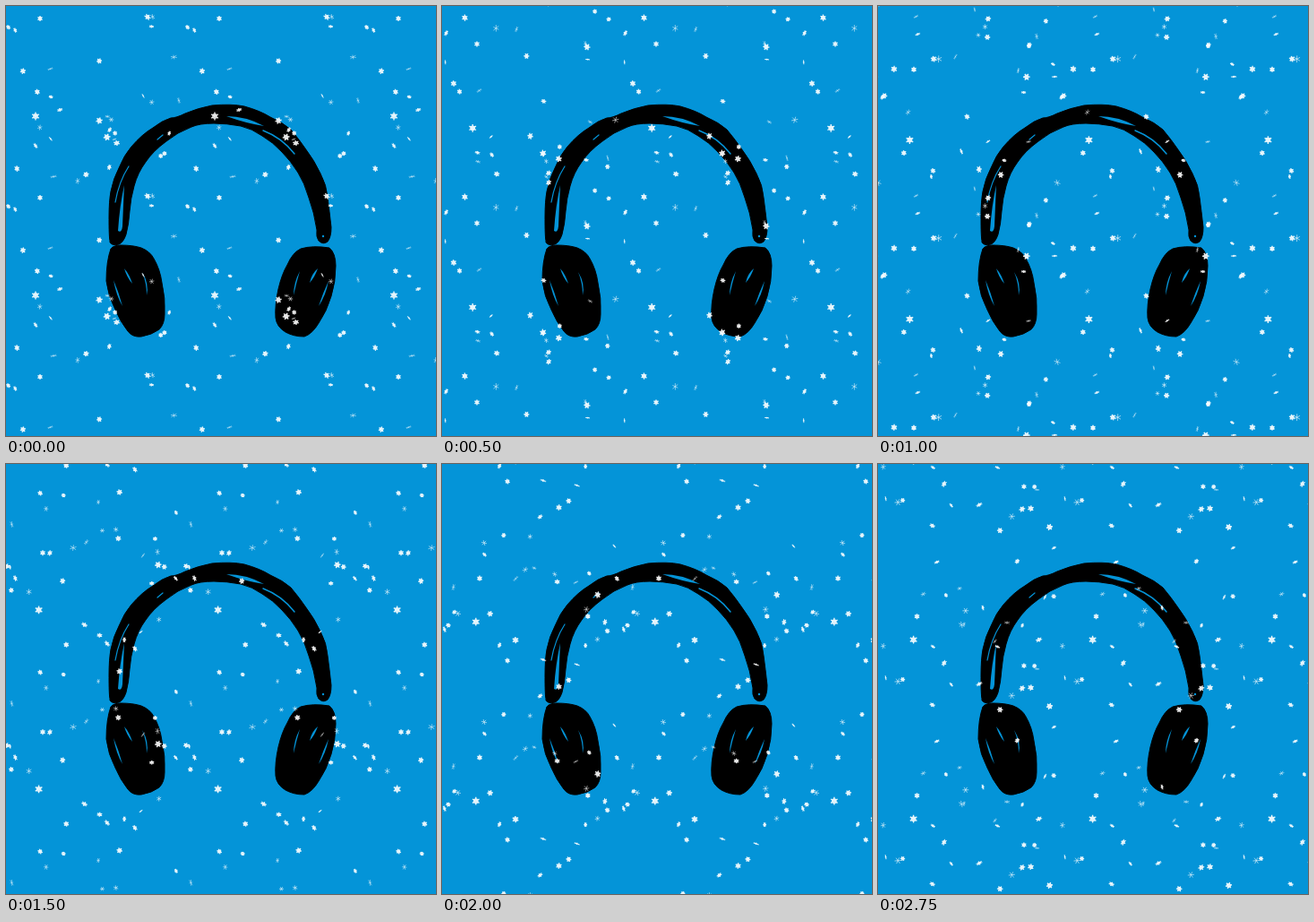
An HTML page with a canvas that plays this animation: 480 px wide and 480 px high, repeating every 3000 ms.

```html
<!DOCTYPE html>
<html lang="en">
<head>
<meta charset="utf-8">
<title>Headphones in the snow</title>
<style>
  html, body { margin: 0; width: 100%; height: 100%; overflow: hidden; background: #0494d8; }
  svg, canvas { position: absolute; inset: 0; width: 100%; height: 100%; display: block; }
  .body { stroke: #000; stroke-linejoin: round; }
  .slit { fill: none; stroke: #0494d8; stroke-linecap: round; }
  .gap { fill: #0494d8; }
</style>
</head>
<body>
<svg viewBox="0 0 480 480">
  <!-- headband -->
  <path class="body" d="M116 262C115 258 115 242 115 236Q115 218 117 207Q120 192 126 181Q132 166 140 157
    Q152 143 164 136Q174 128 184 125Q190 125 200 120Q214 114 230 111Q252 109 266 112
    Q284 117 295 124Q309 130 318 138Q328 150 334 159Q344 172 351 187Q358 200 359 214
    Q361 229 363 247Q363 258 359 263Q354 267 349 262Q346 258 347 250Q344 230 338 214
    Q333 197 326 186Q318 173 308 163Q298 152 286 145Q275 137 262 134Q246 131 232 131
    Q216 131 207 135Q191 141 179 151Q164 162 156 174Q147 186 143 201Q139 215 138 229
    Q137 244 134 255Q131 264 126 266Q119 268 116 264Z"/>
  <path class="gap" d="M132 200Q127 222 125 251Q129 254 130 246Q131 222 132 200Z"/>
  <path class="gap" d="M246 123Q268 123 288 134Q268 131 246 123Z"/>
  <path class="slit" stroke-width="1.2" d="M122 219Q126 196 137 179M169 149L175 144"/>
  <path class="slit" stroke-width="1.5" d="M287 139Q308 147 322 165"/>
  <circle class="gap" cx="354" cy="257" r="1.2"/>
  <!-- ear cups -->
  <path class="body" d="M117 271Q120 267 128 267Q142 267 151 270Q161 274 165 282Q172 294 174 309
    Q178 326 177 344Q177 355 171 361Q163 367 151 369Q141 370 136 363Q128 353 122 339
    Q114 324 112 307Q112 285 117 271Z"/>
  <path class="body" d="M361 270Q368 276 368 290Q368 308 363 324Q358 341 349 354Q342 366 333 369
    Q321 369 312 364Q302 358 301 348Q300 334 304 316Q308 299 314 289Q320 275 329 271
    Q342 267 361 270Z"/>
  <g class="gap">
    <path d="M120 306Q123 323 130 335Q126 320 120 306Z"/>
    <path d="M132 293Q138 300 141 310Q135 303 132 293Z"/>
    <path d="M152 297Q160 310 157 323Q157 309 152 297Z"/>
    <path d="M328 296Q321 309 321 323Q324 309 328 296Z"/>
    <path d="M348 293Q341 299 339 309Q345 302 348 293Z"/>
    <path d="M360 307Q357 323 349 335Q354 320 360 307Z"/>
  </g>
</svg>
<canvas id="snow" width="480" height="480"></canvas>
<script>
const SIZE = 480, TILE = 200, COUNT = 36, LOOP = 3000, STEP = 250;
const ctx = document.getElementById('snow').getContext('2d');

function seeded(seed) {
  return () => {
    seed = (seed * 1664525 + 1013904223) >>> 0;
    return seed / 2 ** 32;
  };
}

const random = seeded(29);
const between = (low, high) => low + (high - low) * random();
const wrap = v => ((v % TILE) + TILE) % TILE;

// Drift and fall are pixels per step; faint flakes are bare stars without a core.
function makeFlake() {
  const faint = random() < .35;
  return {
    x: between(0, TILE), y: between(0, TILE),
    drift: between(-4, 5), fall: between(6, 38),
    radius: faint ? between(2.4, 4) : between(2.4, 4),
    faint, angle: between(0, Math.PI), spin: between(-.5, .5),
    flip: between(0, Math.PI), tumble: between(.1, .4)
  };
}

const flakes = Array.from({ length: COUNT }, makeFlake);

// The two most prominent flakes fall slowly and almost face on.
const facing = { radius: 4.4, faint: false, angle: 0, spin: 0, flip: 0, tumble: 0 };
Object.assign(flakes[0], facing, { x: 33, y: 123, drift: .6, fall: 6.65 });
Object.assign(flakes[1], facing, { x: 38, y: 14, drift: .5, fall: 14.2, radius: 3 });

function drawFlake(flake, x, y, step) {
  const { radius, faint } = flake;
  ctx.save();
  ctx.translate(x, y);
  ctx.rotate(flake.angle + flake.spin * step);
  ctx.scale(1, .25 + .75 * Math.abs(Math.cos(flake.flip + flake.tumble * step)));
  ctx.globalAlpha = faint ? .65 : .9;
  ctx.lineWidth = faint ? .8 : 1.4;
  ctx.beginPath();
  for (let arm = 0; arm < 6; arm++) {
    const a = arm * Math.PI / 3;
    ctx.moveTo(0, 0);
    ctx.lineTo(radius * Math.sin(a), radius * Math.cos(a));
  }
  if (!faint) {
    ctx.moveTo(radius * .5, 0);
    ctx.arc(0, 0, radius * .5, 0, 2 * Math.PI);
  }
  ctx.stroke();
  ctx.restore();
}

function drawSnow(step) {
  ctx.clearRect(0, 0, SIZE, SIZE);
  ctx.strokeStyle = '#fff';
  for (const flake of flakes) {
    const left = wrap(flake.x + flake.drift * step);
    const top = wrap(flake.y + flake.fall * step);
    for (let x = left - TILE; x < SIZE + TILE; x += TILE)
      for (let y = top - TILE; y < SIZE + TILE; y += TILE)
        drawFlake(flake, x, y, step);
  }
}

let shown = -1;
function tick() {
  const step = Math.floor(performance.now() % LOOP / STEP);
  if (step !== shown) drawSnow(shown = step);
  requestAnimationFrame(tick);
}
tick();
</script>
</body>
</html>
```
